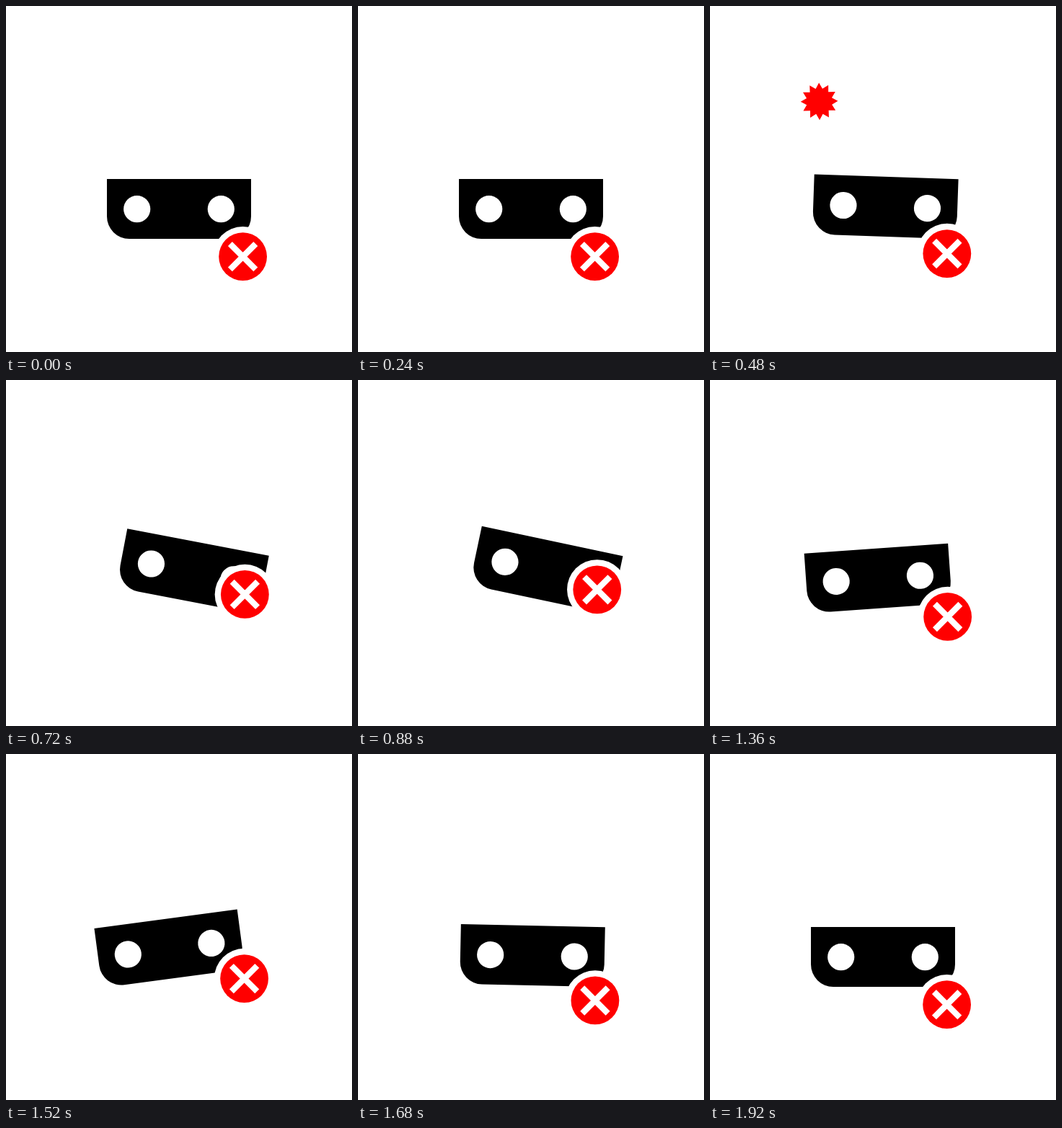
Animation, 480 px wide and 480 px high, one loop 1.96 s. Source, as an HTML page:

```html
<!DOCTYPE html>
<html lang="en">
<head>
<meta charset="utf-8">
<title>Rocking head</title>
<style>
  html, body { margin: 0; width: 100%; height: 100%; overflow: hidden; background: #fff; }
  svg { display: block; width: 100%; height: 100%; }
</style>
</head>
<body>
<svg viewBox="0 0 480 480">
  <g id="head">
    <path d="M140 240H340V292a31 31 0 0 1-31 31H171A31 31 0 0 1 140 292Z"/>
    <g fill="#fff">
      <circle cx="181.7" cy="281.7" r="18.6"/>
      <circle cx="298.3" cy="281.7" r="18.6"/>
    </g>
  </g>
  <path id="star" fill="#f00"/>
  <g id="badge">
    <circle r="41.7" fill="#fff"/>
    <circle r="33.4" fill="#f00"/>
    <path d="M-17.7-17.7L17.7 17.7M17.7-17.7L-17.7 17.7" stroke="#fff" stroke-width="8.4"/>
  </g>
</svg>
<script>
const LOOP = 1960, STEP = 40;

// The CSS "ease" curve, cubic-bezier(.25, .1, .25, 1).
function ease(x) {
  let lo = 0, hi = 1, s = 0.5;
  for (let i = 0; i < 20; i++) {
    s = (lo + hi) / 2;
    if (0.75 * s * (1 - s) + s ** 3 < x) lo = s; else hi = s;
  }
  return 0.3 * s * (1 - s) ** 2 + 3 * s * s * (1 - s) + s ** 3;
}

// Tip over to the right, hold, then rock back and settle.
function swing(t, begin) {
  const poses = [[begin, 0], [910, 12], [1110, 12], [1610, -8], [1760, 4], [1910, 0]];
  const i = poses.findIndex(p => p[0] > t);
  if (i < 1) return 0;
  const [t0, a] = poses[i - 1], [t1, b] = poses[i];
  return a + (b - a) * ease((t - t0) / (t1 - t0));
}

function starPath(r) {
  const pts = [];
  for (let i = 0; i < 24; i++) {
    const a = (i * 15 - 91) * Math.PI / 180, k = i % 2 ? r * 0.7 : r;
    pts.push((151.6 + k * Math.cos(a)).toFixed(2) + " " + (132.3 + k * Math.sin(a)).toFixed(2));
  }
  return "M" + pts.join("L") + "Z";
}

const [head, star, badge] = ["head", "star", "badge"].map(id => document.getElementById(id));

function draw(t) {
  // The head rocks on whichever lower corner it leans towards.
  const angle = swing(t, 410);
  head.setAttribute("transform", `rotate(${angle} ${angle > 0 ? 333 : 147} 373)`);

  // The badge rises with the lean and sets off a little later.
  const up = 4.75 * Math.abs(swing(t, 440));
  badge.setAttribute("transform", `translate(${328.6 + up * 0.055} ${347.7 - up})`);

  const u = (t - 442) / 200;
  star.setAttribute("d", u > 0 && u < 1 ? starPath(46 * Math.sin(Math.PI * u)) : "");
}

const start = performance.now();
function tick() {
  const t = (performance.now() - start) % LOOP;
  draw(Math.floor(t / STEP) * STEP);
  requestAnimationFrame(tick);
}
draw(0);
requestAnimationFrame(tick);
</script>
</body>
</html>
```
